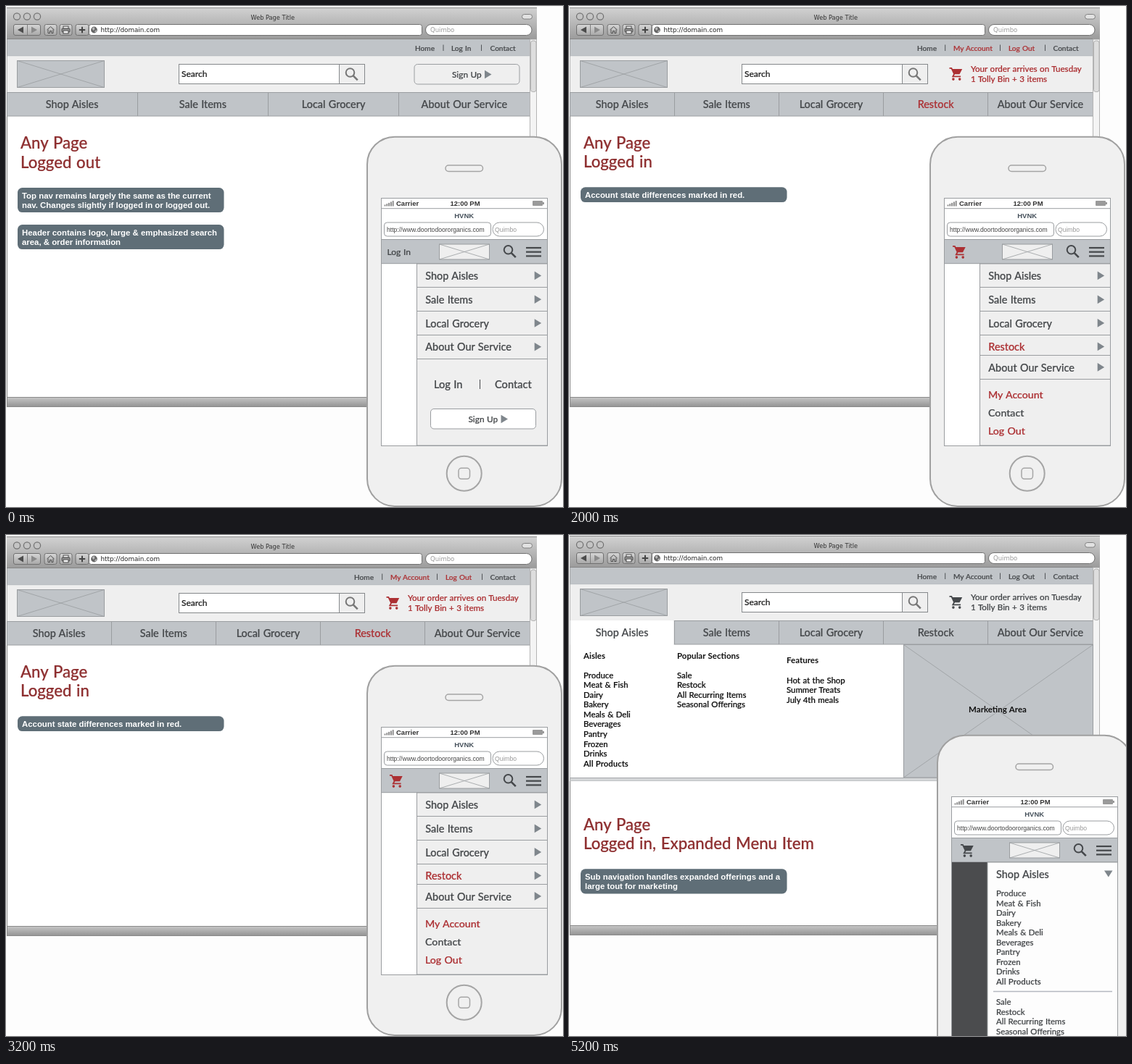
These frames come from a looping animation (768x692 px, 6 s). An HTML page:

```html
<!DOCTYPE html>
<html lang="en">
<head>
<meta charset="utf-8">
<title>Navigation wireframe</title>
<style>
html, body { margin: 0; width: 100%; height: 100%; overflow: hidden; background: #fdfdfd; }
svg { display: block; width: 768px; height: 692px; }
text { font-family: Lato, sans-serif; font-weight: 500; word-spacing: .05em; white-space: pre; stroke-width: .22px; }
.ui { font-family: "DejaVu Sans", sans-serif; font-weight: 400; word-spacing: 0; stroke-width: 0; }
.arial { font-family: "Liberation Sans", Arial, sans-serif; font-weight: 400; word-spacing: 0; stroke-width: 0; }
.bold { font-weight: 700; stroke-width: 0; }
</style>
</head>
<body>
<svg id="stage" viewBox="0 0 768 692" xmlns="http://www.w3.org/2000/svg"></svg>
<script>
const INK = '#45484b', RED = '#ac3033', TITLE = '#8e2f30', BAR = '#c0c4c8',
      PALE = '#efefef', EDGE = '#9a9da0', NOTE = '#5f6e77', ARROW = '#7f868c';
const HOLD = 2000, SCENES = 3;

const rect = (x, y, w, h, fill, stroke = 'none', r = 0, sw = 1) =>
  `<rect x="${x}" y="${y}" width="${w}" height="${h}" rx="${r}" fill="${fill}" stroke="${stroke}" stroke-width="${sw}"/>`;
const path = (d, stroke = EDGE, sw = 1, fill = 'none') =>
  `<path d="${d}" fill="${fill}" stroke="${stroke}" stroke-width="${sw}"/>`;
const circle = (x, y, r, fill, stroke = 'none', sw = 1) =>
  `<circle cx="${x}" cy="${y}" r="${r}" fill="${fill}" stroke="${stroke}" stroke-width="${sw}"/>`;
const text = (s, x, y, size, fill = INK, cls = '', anchor = 'start') =>
  `<text x="${x}" y="${y}" font-size="${size}" fill="${fill}" stroke="${fill}" class="${cls}" text-anchor="${anchor}">${s.replace(/&/g, '&amp;')}</text>`;
const mid = (s, x, y, size, fill, cls) => text(s, x, y, size, fill, cls, 'middle');
const group = (s, x = 0, y = 0) => `<g transform="translate(${x} ${y})">${s}</g>`;
const hline = (x1, x2, y, c = EDGE, w = 1) => path(`M${x1} ${y}H${x2}`, c, w);
const vline = (x, y1, y2, c = EDGE, w = 1) => path(`M${x} ${y1}V${y2}`, c, w);
const arrow = (x, y, c = ARROW) => path(`M${x} ${y}l9.5 5.8l-9.5 5.8z`, 'none', 0, c);

const crossBox = (x, y, w, h, fill) =>
  rect(x, y, w, h, fill, EDGE) +
  path(`M${x} ${y}l${w} ${h}M${x} ${y + h}l${w} ${-h}`, EDGE, .8);
const lens = (x, y, c) => circle(x, y, 5.8, 'none', c, 2) +
  path(`M${x + 4.3} ${y + 4.3}l6 6`, c, 2.6);
const cart = (x, y, c) => group(
  path('M0 .9H2.9L6.6 8.9L4.8 12.4H15.6', c, 1.8) +
  path('M3.6 1.9H17.7L14 9.3H6.8z', 'none', 0, c) +
  circle(5.4, 16.1, 1.8, c) + circle(14.2, 16.1, 1.8, c), x, y);
const list = (items, x, y, color, step = 13.55) => items.map((s, i) =>
  text(s, x, y + i * step, 11.35, color, s === 'All Products' ? 'bold' : '')).join('');
const signUp = (x, y, fill) => rect(x, y, 145, 27.5, fill, EDGE, 4.5) +
  text('Sign Up', x + 52, y + 18.2, 11.8) + arrow(x + 97, y + 8.2);
const note = (y, lines) => rect(16, y, 284.5, lines.length * 13.3 + 7.5, NOTE, 'none', 6.5) +
  lines.map((s, i) => text(s, 22, y + 14.7 + i * 13.3, 11.4, '#fff', 'arial bold')).join('');
const heading = (y, second) =>
  text('Any Page', 20, y, 22.2, TITLE) + text(second, 20, y + 26.5, 22.2, TITLE);

const aisles = ['Produce', 'Meat & Fish', 'Dairy', 'Bakery', 'Meals & Deli',
  'Beverages', 'Pantry', 'Frozen', 'Drinks', 'All Products'];
const popular = ['Sale', 'Restock', 'All Recurring Items', 'Seasonal Offerings'];
const guestNav = ['Shop Aisles', 'Sale Items', 'Local Grocery', 'About Our Service'];
const userNav = ['Shop Aisles', 'Sale Items', 'Local Grocery', 'Restock', 'About Our Service'];

function browser() {
  const button = (x, w) => rect(x, 25.5, w, 15, 'url(#btn)', '#707070', 2.5);
  const dark = '#4c4c4c';
  return rect(1.5, 2.5, 730, 551, '#fff', '#8a8a8a') +
    rect(1, 2, 731, 44, 'url(#chrome)') + hline(1, 732, 2.5, '#8a8a8a') + hline(1, 732, 45.5, '#858585') +
    [15, 29, 43].map(x => circle(x, 14.5, 4.6, '#c4c4c4', '#707070', 1.2)).join('') +
    rect(711.5, 11.5, 14, 6.5, '#e2e2e2', '#808080', 3.2) +
    mid('Web Page Title', 367.8, 18.7, 8.2, '#333', 'ui') +
    button(10.5, 37) + vline(29.5, 26, 40, '#808080') +
    path('M24 28.5v9l-8-4.5z', 'none', 0, dark) + path('M35 28.5v9l8-4.5z', 'none', 0, '#8a8a8a') +
    button(53, 17) + path('M56.5 33L61.5 28.5L66.5 33M58 32.5V37.5H60.5V34.5H62.8V37.5H65V32.5', dark) +
    button(74, 17) + rect(77, 31, 11, 5, '#999', dark, 1) +
    rect(79, 28, 7, 3, '#eee', dark) + rect(79, 34, 7, 4, '#eee', dark) +
    button(96, 18) + path('M105 28.8V37.2M100.8 33H109.2', '#444', 2) +
    rect(114.5, 25.5, 459, 15, '#fff', '#707070', 3) +
    circle(121.5, 33, 4.4, '#666') + path('M118.5 31l3-2l1 3l-2 2zM122 35l2.5-2l.5 2l-2 1.5z', 'none', 0, '#bbb') +
    text('http://domain.com', 130.5, 36, 8.8, '#222', 'ui') +
    rect(578.5, 25.5, 146.5, 15, '#fff', '#707070', 7.5) +
    text('Quimbo', 585, 36.2, 8.5, '#999', 'ui') +
    rect(1.5, 46, 721, 23, BAR) + hline(1, 722, 69, '#b2b6ba') +
    rect(1.5, 69.5, 721, 50, PALE) +
    crossBox(15.5, 75.5, 120, 37, BAR) +
    rect(238.5, 80.5, 221, 27, '#fff', '#85888b') + text('Search', 242, 98.3, 12, '#222') +
    rect(459.5, 80.5, 35, 27, PALE, '#85888b') + lens(474.5, 92, '#777') +
    rect(1.5, 119.5, 721, 32.5, BAR, EDGE) +
    rect(722.5, 46, 9, 495, '#f4f4f4', '#b5b5b5') + rect(723.5, 48, 7.5, 70.5, '#dedede', '#b0b0b0', 3) +
    rect(1.5, 540.5, 730, 13, 'url(#foot)', '#8a8a8a');
}

function nav(items, red, open) {
  const w = 721 / items.length;
  return (open ? rect(1.5, 119, w - 1, 34, '#fff') : '') +
    items.map((s, i) =>
      (i ? vline(Math.floor(1 + i * w) + .5, 119, 152) : '') +
      mid(s, 1 + w * (i + .5), 141, 14.4, s === 'Restock' ? red : INK)).join('');
}

function links(items, bars, red) {
  return items.map(([s, x]) => text(s, x, 61.8, 10.1, /My|Out/.test(s) ? red : INK)).join('') +
    bars.map(x => vline(x, 53.5, 62, INK, .9)).join('');
}

function guestTop() {
  return links([['Home', 564], ['Log In', 614], ['Contact', 667.5]], [603, 655.5]) +
    signUp(563, 80.5, PALE) + nav(guestNav);
}

function userTop(red, open) {
  return links([['Home', 480], ['My Account', 530], ['Log Out', 606], ['Contact', 667.5]], [518.7, 594.5, 656.5], red) +
    cart(524.5, 85, red) +
    text('Your order arrives on Tuesday', 554, 91.2, 11.6, red) +
    text('1 Tolly Bin + 3 items', 554, 104.7, 11.6, red) + nav(userNav, red, open);
}

function dropdown() {
  const black = '#111';
  return rect(1.5, 152, 460, 183, '#fff') + crossBox(461.5, 151.5, 261, 183.5, BAR) +
    mid('Marketing Area', 591, 245, 11.5, black, 'bold') +
    rect(1.5, 335, 721, 4.5, '#d4d6d8') + hline(1, 722, 335.5, '#a6a9ac') + hline(1, 722, 339.5, '#c2c4c6') +
    text('Aisles', 20, 170.7, 11.5, black, 'bold') + list(aisles, 20, 197.7, black) +
    text('Popular Sections', 149, 170.7, 11.5, black, 'bold') + list(popular, 149, 197.7, black) +
    text('Features', 300, 177.4, 11.5, black, 'bold') +
    list(['Hot at the Shop', 'Summer Treats', 'July 4th meals'], 300, 204.6, black);
}

function phone() {
  const bars = [2, 3.3, 4.6, 6, 7.4].map((h, i) =>
    rect(521.5 + i * 2.8, 276.5 - h, 2, h, '#8f8f8f')).join('');
  return rect(498, 180.7, 268, 510.3, '#f0f0f0', '#a0a0a0', 38, 2) +
    rect(606, 220, 51.5, 8.5, '#f0f0f0', '#a5a5a5', 4.2, 1.5) +
    circle(631.7, 645.8, 24, '#f0f0f0', '#a5a5a5', 2) +
    rect(624, 638.3, 15.5, 15, '#f0f0f0', '#a5a5a5', 4, 1.5) +
    rect(517.5, 265.5, 229, 342, '#fff', EDGE) + hline(517, 746, 279.7) +
    bars + text('Carrier', 538, 276, 9.5, '#333', 'arial bold') +
    mid('12:00 PM', 633, 276, 9.5, '#333', 'arial bold') +
    rect(726, 269, 14, 7, '#9a9a9a', 'none', 1) + rect(740, 271, 2, 3, '#9a9a9a') +
    mid('HVNK', 631.7, 293, 9.5, '#45505a', 'arial bold') +
    rect(521.5, 299, 147, 19, '#fff', EDGE, 4) +
    text('http://www.doortodoororganics.com', 525, 311.5, 8.6, '#444', 'arial') +
    rect(671, 299, 70.5, 19, '#fff', EDGE, 9.5) + text('Quimbo', 674, 311.5, 8.6, '#999', 'arial') +
    rect(518, 322.5, 228, 33.5, BAR) + hline(517, 746, 322.5) + hline(518, 746, 355.7) +
    crossBox(597.5, 329, 69, 21, PALE) + lens(692.5, 336.8, INK) +
    [334, 339.7, 345.4].map(y => hline(717, 738, y, INK, 2.2)).join('');
}

function menu(rows, lines) {
  return rect(566.5, 356, 180, 251, PALE, EDGE) +
    rows.map(([s, y]) => text(s, 578.3, y, 14.4, s === 'Restock' ? RED : INK) + arrow(728.7, y - 11.4)).join('') +
    lines.map(y => hline(566, 746, y)).join('');
}

function guestMenu() {
  return text('Log In', 525.5, 344, 12) +
    menu(guestNav.map((s, i) => [s, 378 + i * 32.8]), [388.5, 421.5, 454.5, 487.5]) +
    text('Log In', 590, 527.7, 14.6) + vline(653.5, 516, 529, INK) + text('Contact', 674, 527.7, 14.6) +
    signUp(585.5, 556.5, '#fff');
}

function userMenu() {
  const y = [378, 411, 443.5, 476, 504.5];
  return cart(529, 331, RED) +
    menu(userNav.map((s, i) => [s, y[i]]), [388.5, 421.5, 454.5, 482.5, 515.5]) +
    text('My Account', 578, 541.7, 14.2, RED) + text('Contact', 578, 566.7, 14.2) +
    text('Log Out', 578, 591.7, 14.2, RED);
}

function openMenu() {
  return cart(530, 331, INK) + rect(518, 356, 49, 251, '#4b4c4e') +
    rect(567, 356, 179.5, 251, '#fdfdfd', EDGE) +
    text('Shop Aisles', 579, 377.8, 14.4) + path('M728 367.5h11.5l-5.7 9z', 'none', 0, ARROW) +
    list(aisles, 579, 403, INK) + hline(575, 739, 534.5, '#b4b8c0', 1.6) +
    list(popular, 579, 553, INK);
}

const scenes = [
  group(browser() + guestTop()) + heading(197, 'Logged out') +
    note(251, ['Top nav remains largely the same as the current', 'nav. Changes slightly if logged in or logged out.']) +
    note(302, ['Header contains logo, large & emphasized search', 'area, & order information']) +
    group(phone() + guestMenu()),
  group(browser() + userTop(RED)) + heading(196.7, 'Logged in') +
    note(250.3, ['Account state differences marked in red.']) +
    group(phone() + userMenu()),
  group(browser() + userTop(INK, true), 0, -1) + dropdown() +
    heading(407.8, 'Logged in, Expanded Menu Item') +
    note(461.3, ['Sub navigation handles expanded offerings and a', 'large tout for marketing']) +
    group(phone() + openMenu(), 10, 96)
];

const gradient = (id, a, b) =>
  `<linearGradient id="${id}" x2="0" y2="1"><stop stop-color="${a}"/><stop offset="1" stop-color="${b}"/></linearGradient>`;
const stage = document.getElementById('stage');
stage.innerHTML = '<defs>' + gradient('chrome', '#d2d2d2', '#9b9b9b') +
  gradient('btn', '#d6d6d6', '#a8a8a8') + gradient('foot', '#c6c6c6', '#949494') + '</defs>' +
  scenes.map(s => `<g class="scene">${s}</g>`).join('');
const layers = stage.querySelectorAll('.scene');

function draw(ms) {
  const now = Math.floor(ms / HOLD) % SCENES;
  layers.forEach((g, i) => g.setAttribute('display', i === now ? 'inline' : 'none'));
}

let start;
function tick(ms) {
  start ??= ms;
  draw(ms - start);
  requestAnimationFrame(tick);
}
draw(0);
requestAnimationFrame(tick);
</script>
</body>
</html>
```
